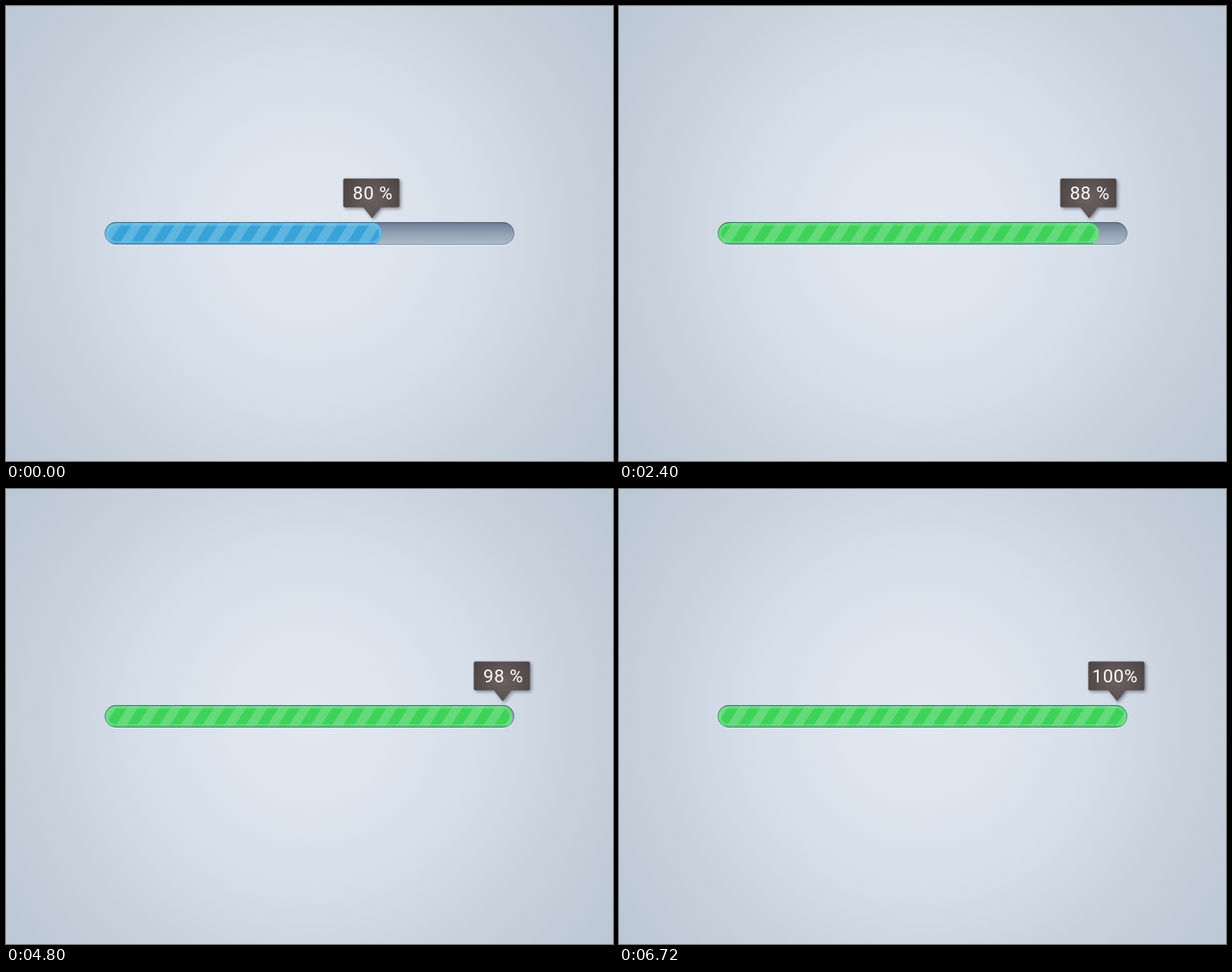
An HTML page with a canvas for the animation above (6760 ms loop, 800 by 600 pixels).

```html
<!DOCTYPE html>
<html lang="en">
<head>
<meta charset="utf-8">
<title>Progress bar</title>
<style>
html, body { margin: 0; width: 100%; height: 100%; overflow: hidden; background: #d0d9e3; }
canvas { display: block; }
</style>
</head>
<body>
<canvas id="stage" width="800" height="600"></canvas>
<script>
const ctx = document.getElementById('stage').getContext('2d');
const LOOP = 6760, STEP = 40, MOVE = 5800, TINT = 1300;
const PITCH = 28.5, SLANT = 18;

const mix = (a, b, k) => a + (b - a) * k;
const smooth = x => x * x * (3 - 2 * x);
const clamp = x => Math.min(1, Math.max(0, x));
const blend = (a, b, k) => `rgb(${a.map((v, i) => Math.round(mix(v, b[i], k)))})`;

// Cubic ease with control points (x1, 0) and (x2, 1), solved by bisection.
function ease(x, x1, x2) {
  let lo = 0, hi = 1;
  for (let i = 0; i < 30; i++) {
    const s = (lo + hi) / 2, u = 1 - s;
    if (3 * u * u * s * x1 + 3 * u * s * s * x2 + s ** 3 < x) lo = s; else hi = s;
  }
  return smooth(lo);
}

function fillGradient(gradient, stops) {
  stops.forEach(([at, color]) => gradient.addColorStop(at, color));
  return gradient;
}
const vertical = (y0, y1, ...stops) => fillGradient(ctx.createLinearGradient(0, y0, 0, y1), stops);
const radial = (x, y, r, ...stops) => fillGradient(ctx.createRadialGradient(x, y, 0, x, y, r), stops);

function pill(x, y, w, h, r) {
  ctx.beginPath();
  ctx.roundRect(x, y, w, h, r);
}

function drawBackground() {
  ctx.fillStyle = radial(400, 300, 500,
    [0, '#e2e7ef'], [.2, '#dee5ef'], [.45, '#d5dee9'], [.72, '#c8d1db'], [1, '#bbc7d5']);
  ctx.fillRect(0, 0, 800, 600);
}

function drawTrack() {
  pill(130, 286, 540, 30, 15);
  ctx.fillStyle = 'rgba(255,255,255,.65)';
  ctx.fill();
  pill(130, 285, 540, 30, 15);
  ctx.fillStyle = vertical(285, 315, [0, '#67778e'], [.15, '#77879d'], [.5, '#92a1b4'], [1, '#aebbca']);
  ctx.fill();
}

function drawOutline() {
  pill(130.5, 285.5, 539, 29, 14.5);
  ctx.strokeStyle = vertical(285, 315,
    [0, 'rgba(60,78,104,.75)'], [.5, 'rgba(70,92,120,.5)'], [1, 'rgba(85,108,135,.5)']);
  ctx.lineWidth = 1;
  ctx.stroke();
}

function drawFill(edge, t) {
  const k = smooth(clamp(t / TINT));
  const base = blend([57, 162, 216], [62, 210, 88], k);
  const light = blend([94, 181, 223], [100, 218, 122], k);
  const rim = blend([112, 200, 238], [112, 229, 138], k);
  const low = blend([42, 136, 192], [44, 172, 104], k);
  const width = edge - 131;

  ctx.save();
  pill(131, 286, width, 28, [14, 12, 12, 14]);
  ctx.fillStyle = base;
  ctx.fill();
  ctx.clip();

  ctx.fillStyle = light;
  const shift = t / 1000 % 1 * PITCH;
  for (let x = 149 - 3 * PITCH + shift; x < edge; x += PITCH) {
    ctx.beginPath();
    ctx.moveTo(x, 314);
    ctx.lineTo(x + PITCH / 2, 314);
    ctx.lineTo(x + PITCH / 2 + SLANT, 286);
    ctx.lineTo(x + SLANT, 286);
    ctx.fill();
  }

  // Soft inner rim, brighter above, with a shaded lower edge.
  ctx.strokeStyle = rim;
  ctx.globalAlpha = .45;
  for (const [inset, weight] of [[2, 4], [1.5, 2]]) {
    pill(131 + inset, 286 + inset, width - 2 * inset, 28 - 2 * inset, [13, 11, 11, 13]);
    ctx.lineWidth = weight;
    ctx.stroke();
  }
  ctx.globalAlpha = .6;
  ctx.fillStyle = low;
  ctx.fillRect(131, 312, width, 2);
  ctx.restore();
}

function drawTip(left, percent) {
  const mid = left + 38.5;
  ctx.save();
  ctx.beginPath();
  ctx.roundRect(left + .5, 227.5, 74, 38, 2);
  ctx.moveTo(mid - 12, 265);
  ctx.lineTo(mid + 12, 265);
  ctx.lineTo(mid, 280);
  ctx.closePath();
  ctx.shadowColor = 'rgba(40,45,60,.5)';
  ctx.shadowBlur = 4;
  ctx.shadowOffsetX = ctx.shadowOffsetY = 2;
  ctx.fillStyle = radial(mid, 254, 46, [0, '#6c6160'], [.5, '#5b5251'], [1, '#4a4343']);
  ctx.fill();
  ctx.restore();

  ctx.font = '24px Roboto, sans-serif';
  ctx.letterSpacing = '0.6px';
  ctx.textAlign = 'right';
  ctx.fillStyle = '#fff';
  ctx.fillText(percent < 100 ? percent + ' %' : '100%', left + 66, 255);
}

function draw(now) {
  const t = Math.floor(now % LOOP / STEP) * STEP;
  const x = clamp(t / MOVE);
  const left = 444 + 174 * ease(x, .334, .01);
  drawBackground();
  drawTrack();
  drawFill(left + 51, t);
  drawOutline();
  drawTip(left, Math.round(80 + 20 * mix(x, smooth(x), .7)));
  requestAnimationFrame(() => draw(performance.now() - start));
}

const start = performance.now();
draw(0);
</script>
</body>
</html>
```
